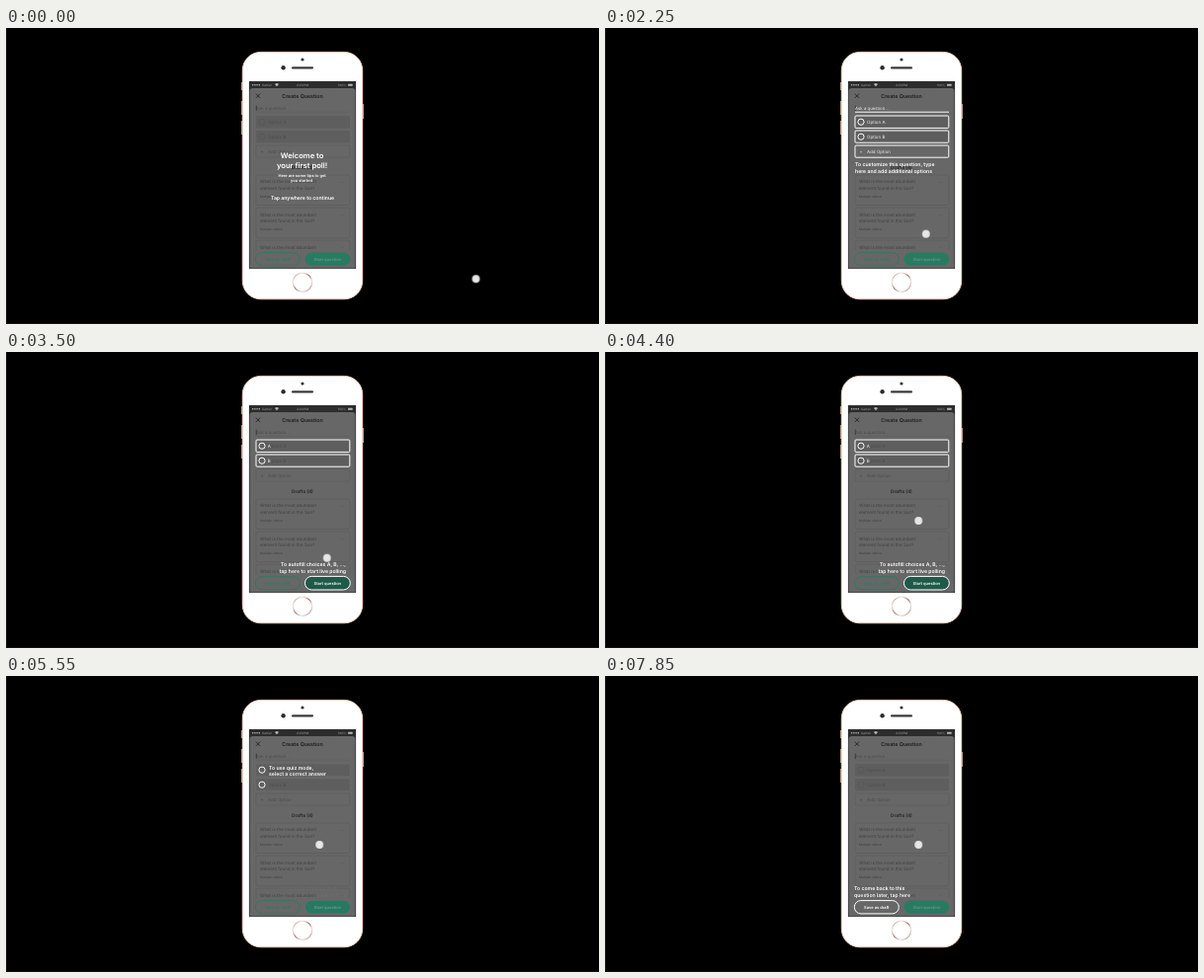
These frames come from a looping animation (600x300 px, 8000 ms). An HTML page:

```html
<!DOCTYPE html>
<html lang="en">
<head>
<meta charset="utf-8">
<title>First poll walkthrough</title>
<style>
  html, body { margin: 0; width: 100%; height: 100%; overflow: hidden; background: #000; }
  svg { display: block; width: 100vw; height: 100vh; }
  text { font: 400 4.5px Inter, "Open Sans", sans-serif; text-rendering: geometricPrecision; }
  .status text { font-size: 3px; fill: #a5a5a5; }
  .title { font-size: 5.3px; font-weight: 600; fill: #1d1d1d; }
  .drafts { font-size: 4.75px; font-weight: 600; fill: #222; }
  .dim { fill: #4c4c4c; }
  .card { fill: none; stroke: #5c5c5c; stroke-width: .6; }
  .body { fill: #404040; }
  .kind { font-size: 3.2px; fill: #3c3c3c; }
  .btn { font-size: 4.05px; font-weight: 600; }
  .mid { text-anchor: middle; }
  .end { text-anchor: end; }

  .step text { fill: #fff; }
  .step .big { font-size: 7.65px; font-weight: 600; }
  .step .small { font-size: 4px; font-weight: 600; }
  .step .tip { font-size: 5.15px; font-weight: 600; }
  .ring { fill: none; stroke: #fff; stroke-width: 1; }

  .step, .cursor, .dot { animation: 8s linear infinite; }
  .welcome { animation-name: welcome; }
  .edit { animation-name: edit; }
  .autofill { animation-name: autofill; }
  .quiz { animation-name: quiz; }
  .save { animation-name: save; }
  .cursor { animation-name: travel; }
  .dot { animation-name: press; }

  @keyframes welcome { 0%, 12.5% { opacity: 1 } 15.625%, 100% { opacity: 0 } }
  @keyframes edit { 0%, 12.5% { opacity: 0 } 15.625%, 40.625% { opacity: 1 } 43.75%, 100% { opacity: 0 } }
  @keyframes autofill { 0%, 40.625% { opacity: 0 } 43.75%, 66.25% { opacity: 1 } 69.5%, 100% { opacity: 0 } }
  @keyframes quiz { 0%, 66.25% { opacity: 0 } 69.5%, 95% { opacity: 1 } 98.125%, 100% { opacity: 0 } }
  @keyframes save { 0%, 95% { opacity: 0 } 98.125%, 100% { opacity: 1 } }
  @keyframes travel {
    0%, 1.875% { transform: translate(475.5px, 254.3px); animation-timing-function: ease-in-out }
    8.75%, 46.25% { transform: translate(324.8px, 208.7px); animation-timing-function: ease-in-out }
    52.5%, 100% { transform: translate(317.2px, 171px) }
  }
  @keyframes press {
    0%, 8.75%, 12.5%, 35.625%, 40%, 61.25%, 65.625%, 90.625%, 95%, 100% { transform: scale(1) }
    10.625%, 37.8%, 63.4%, 92.8% { transform: scale(.75) }
  }
</style>
</head>
<body>
<svg viewBox="0 0 600 300" preserveAspectRatio="none">
  <defs>
    <linearGradient id="rose" x1="0" y1="0" x2="1" y2="1">
      <stop offset="0" stop-color="#a98474"/>
      <stop offset=".25" stop-color="#f1e4de"/>
      <stop offset=".5" stop-color="#9a7464"/>
      <stop offset=".72" stop-color="#f1e4de"/>
      <stop offset="1" stop-color="#8d6553"/>
    </linearGradient>
    <clipPath id="screen"><rect x="246" y="54" width="108" height="190"/></clipPath>
    <g id="draft">
      <rect class="card" x="253" y="149" width="95" height="30.5" rx="2"/>
      <text class="body" x="257" y="157.4">What is the most abundant</text>
      <text class="body" x="257" y="163.6">element found in the Sun?</text>
      <text class="kind" x="257" y="172.2">Multiple choice</text>
      <text class="body" x="338" y="156.6">...</text>
    </g>
    <g id="radios" class="ring">
      <circle cx="259" cy="95.2" r="3.1"/>
      <circle cx="259" cy="110.2" r="3.1"/>
    </g>
    <g id="boxes" class="ring">
      <rect x="253" y="89" width="94.8" height="12.4" rx="1"/>
      <rect x="253" y="104" width="94.8" height="12.2" rx="1"/>
    </g>
  </defs>

  <rect width="600" height="300"/>
  <path d="M.5 0V300" stroke="#191919"/>
  <path d="M0 299.5H600" stroke="#1a0b08"/>

  <!-- phone -->
  <path d="M238.8 55v8M238.8 74v14M238.8 94v14M361.2 77v15" stroke="#d9b3a2" stroke-width="1.2"/>
  <rect x="239.3" y="24.4" width="121.4" height="250.4" rx="18.5" fill="#fff" stroke="#f0cdbd"/>
  <circle cx="300" cy="32" r="1.6" fill="#333"/>
  <circle cx="280.6" cy="40.3" r="2.2" fill="#2b2b2e"/>
  <rect x="289" y="39.3" width="22" height="2.1" rx="1" fill="#3b3b3d"/>
  <circle cx="300" cy="257.8" r="9.6" fill="#fff" stroke="url(#rose)" stroke-width="1.1"/>

  <!-- dimmed page -->
  <g clip-path="url(#screen)">
    <rect x="246" y="54" width="108" height="190" fill="#2d2d2d"/>
    <g class="status">
      <g fill="#b5b5b5">
        <circle cx="249.7" cy="57.8" r=".8"/><circle cx="251.9" cy="57.8" r=".8"/>
        <circle cx="254.1" cy="57.8" r=".8"/><circle cx="256.3" cy="57.8" r=".8"/>
        <path d="M272 57q2-1.8 4 0l-2 2.2z"/>
        <rect x="346" y="56.8" width="4.6" height="2" rx=".4"/>
      </g>
      <text x="259" y="58.9">Carrier</text>
      <text class="mid" x="300" y="58.9">4:20 PM</text>
      <text x="336" y="58.9">100%</text>
    </g>
    <path d="M246 244V65q0-4 4-4H350q4 0 4 4V244z" fill="#676767"/>
    <path d="M252.8 66.6l4.4 4.4m0-4.4l-4.4 4.4" stroke="#1d1d1d" stroke-width=".8"/>
    <text class="title mid" x="300" y="70.8">Create Question</text>
    <text class="dim" x="253" y="82.6" style="font-size:4.35px">Ask a question...</text>
    <path d="M253.3 78.6v5.4" stroke="#333" stroke-width=".8"/>
    <path d="M253 85.2H348" stroke="#5d5d5d" stroke-width=".5"/>
    <g fill="#5e5e5e">
      <rect x="253" y="89" width="95" height="12.4" rx="1"/>
      <rect x="253" y="104" width="95" height="12.2" rx="1"/>
    </g>
    <rect class="card" x="253" y="119" width="95" height="12.2" rx="1"/>
    <g fill="none" stroke="#555" stroke-width=".6">
      <circle cx="259" cy="95.2" r="3"/><circle cx="259" cy="110.2" r="3"/>
    </g>
    <text class="dim" x="265" y="96.8">Option A</text>
    <text class="dim" x="265" y="111.8">Option B</text>
    <text class="body mid" x="259" y="126.7">+</text>
    <text class="dim" x="265" y="126.7">Add Option</text>
    <text class="drafts mid" x="300" y="143.1">Drafts (4)</text>
    <use href="#draft"/>
    <use href="#draft" y="33.2"/>
    <use href="#draft" y="66.2"/>
    <rect x="246" y="225" width="108" height="19" fill="#676767"/>
    <rect x="252.3" y="227.8" width="45" height="13" rx="6.5" fill="none" stroke="#2a7a62" stroke-width=".9"/>
    <text class="btn mid" x="274.8" y="235.8" fill="#2a7a62">Save as draft</text>
    <rect x="302.5" y="227.4" width="45.8" height="13.6" rx="6.8" fill="#2a7a62"/>
    <text class="btn mid" x="325.3" y="235.8" fill="#5f9c88">Start question</text>
  </g>
  <rect x="246.2" y="54.2" width="107.6" height="189.6" fill="none" stroke="#2a2a2a" stroke-width=".6"/>

  <!-- tips -->
  <g class="step welcome mid">
    <text class="big" x="299.6" y="132">Welcome to</text>
    <text class="big" x="299.6" y="142.3">your first poll!</text>
    <text class="small" x="299.6" y="150.6">Here are some tips to get</text>
    <text class="small" x="299.6" y="156.2">you started.</text>
    <text class="tip" x="300" y="174.2">Tap anywhere to continue</text>
  </g>

  <g class="step edit">
    <text x="253" y="82.6" style="font-size:4.35px">Ask a question...</text>
    <path class="ring" d="M253 85.2H348"/>
    <use href="#boxes"/>
    <rect class="ring" x="253" y="119" width="94.8" height="12.2" rx="1"/>
    <use href="#radios"/>
    <text x="265" y="96.8">Option A</text>
    <text x="265" y="111.8">Option B</text>
    <text class="mid" x="259" y="126.7">+</text>
    <text x="265" y="126.7">Add Option</text>
    <text class="tip" x="253" y="140.2">To customize this question, type</text>
    <text class="tip" x="253" y="147">here and add additional options</text>
  </g>

  <g class="step autofill">
    <use href="#boxes"/>
    <use href="#radios"/>
    <text x="264.8" y="96.8" font-weight="600">A</text>
    <text x="264.8" y="111.8" font-weight="600">B</text>
    <text class="tip end" x="344" y="217">To autofill choices A, B, ...,</text>
    <text class="tip end" x="344" y="223.8">tap here to start live polling</text>
    <rect x="302.5" y="227.4" width="45.8" height="13.6" rx="6.8" fill="#1f5a49" stroke="#fff"/>
    <text class="btn mid" x="325.3" y="235.8">Start question</text>
  </g>

  <g class="step quiz">
    <use href="#radios"/>
    <text class="tip" x="266" y="94.6">To use quiz mode,</text>
    <text class="tip" x="266" y="101.2">select a correct answer</text>
  </g>

  <g class="step save">
    <text class="tip" x="252" y="217">To come back to this</text>
    <text class="tip" x="252" y="223.8">question later, tap here</text>
    <rect x="252.3" y="227.6" width="45" height="13.3" rx="6.6" fill="#676767" stroke="#fff"/>
    <text class="btn mid" x="274.8" y="235.8">Save as draft</text>
  </g>

  <g class="cursor"><circle class="dot" r="3.9" fill="#e6e6e6"/></g>
</svg>
</body>
</html>
```
